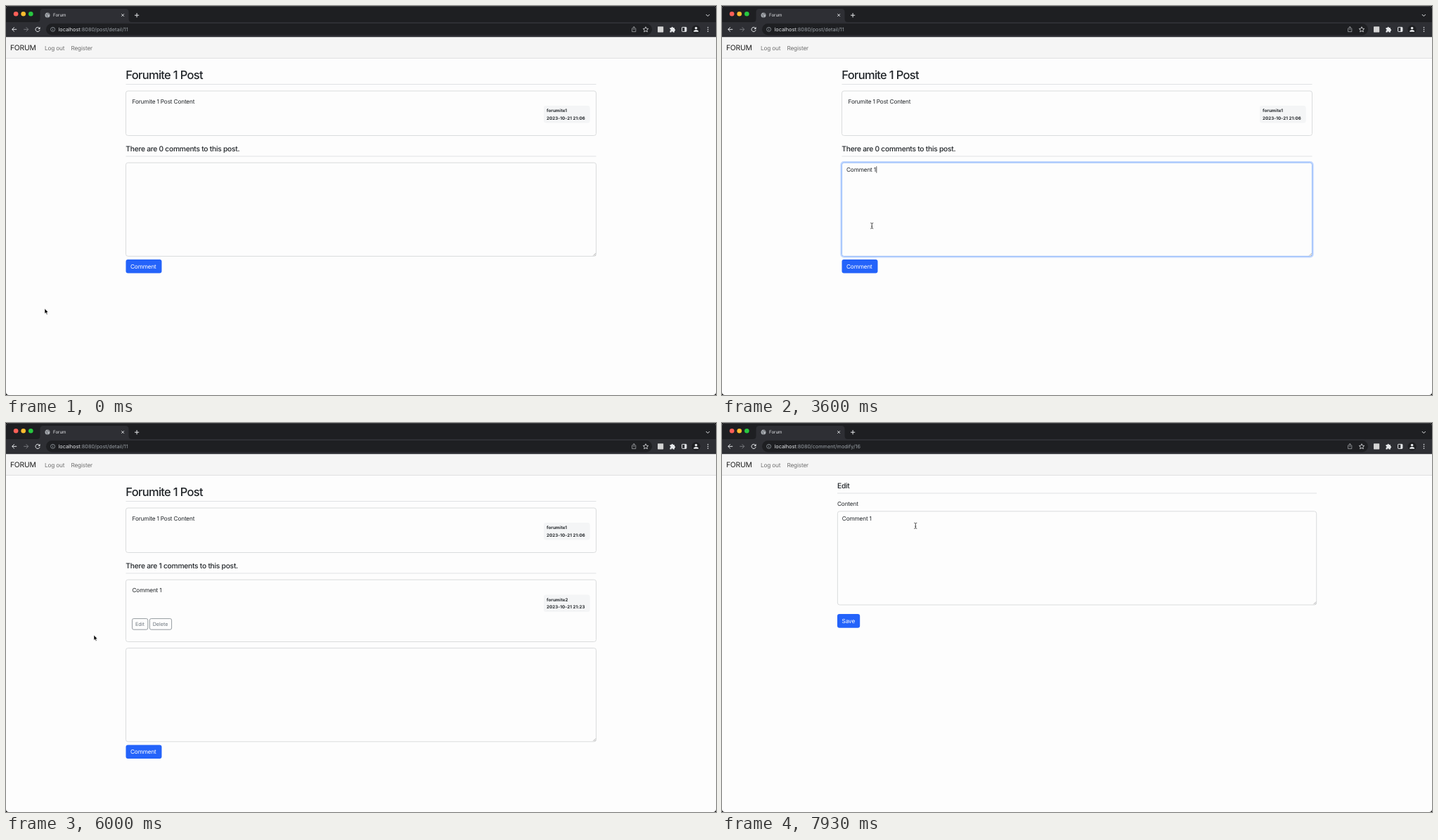
An HTML page for the animation above (8 s loop, 1010 px wide and 554 px high).

```html
<!DOCTYPE html>
<html lang="en">
<head>
<meta charset="utf-8">
<title>Forum</title>
<style>
html, body { margin: 0; width: 100%; height: 100%; overflow: hidden; background: #000; }
svg { display: block; width: 1010px; height: 554px; }
text { font-family: Inter, "Liberation Sans", sans-serif; text-rendering: geometricPrecision; white-space: pre; }
.body { font-size: 8.26px; letter-spacing: -.02em; }
.h2 { font-size: 16.5px; font-weight: 500; letter-spacing: -.042em; }
.h5 { font-size: 10.3px; font-weight: 500; letter-spacing: -.027em; }
.brand { font-size: 10.3px; letter-spacing: -.02em; }
.badge { font-size: 6.2px; font-weight: 700; letter-spacing: .015em; }
.small { font-size: 7.2px; }
.ui { font-size: 6.2px; }
.url { font-size: 7.3px; }
</style>
</head>
<body>
<svg id="stage" viewBox="0 0 1010 554" xmlns="http://www.w3.org/2000/svg"></svg>
<script>
const LOOP = 8000;
const INK = '#212529', GREY = '#727272', LINE = '#d6d8da', BLUE = [36, 99, 250], BLUE_DARK = [31, 80, 208];
const MESSAGE = 'Comment 1';
const KEY_TIMES = [2370, 2430, 2500, 2570, 2630, 2770, 2870, 3000, 3130];
const FOCUS = 1070, PRESS = 4530, POSTED = 4630, OPEN_EDIT = 7265;

const text = (x, y, cls, str, fill = INK, extra = '') =>
  `<text x="${x}" y="${y}" class="${cls}" fill="${fill}" ${extra}>${str}</text>`;
const box = (x, y, w, h, r, fill, extra = '') =>
  `<rect x="${x}" y="${y}" width="${w}" height="${h}" rx="${r}" fill="${fill}" ${extra}/>`;
const path = (d, stroke, w = 1, extra = '') =>
  `<path d="${d}" fill="none" stroke="${stroke}" stroke-width="${w}" ${extra}/>`;
const dot = (x, y, r, fill, extra = '') => `<circle cx="${x}" cy="${y}" r="${r}" fill="${fill}" ${extra}/>`;
const frame = (x, y, w, h, extra = '') => box(x, y, w, h, 3, '#fdfdfd', `stroke="${LINE}" stroke-width=".9" ${extra}`);
const rule = (x, y, w) => path(`M${x} ${y}h${w}`, '#dddfe1', .9);
const badge = (y, name, date) =>
  box(765, y, 65.6, 24.4, 3, '#f4f5f6') +
  text(769, y + 9.1, 'badge', name) + text(769, y + 19.6, 'badge', date);
const grip = (x, y) => path(`M${x - 4.2} ${y - .8}l3.6 -3.6M${x - 2.2} ${y - .8}l1.6 -1.6`, '#8a8a8a', .6);
const outlined = (id, x, w, label, tx) =>
  box(x, 278.6, w, 15.6, 2.2, 'transparent', `id="${id}" stroke="#7b838a" stroke-width=".8"`) +
  text(tx, 289.1, 'small', label, '#6c757d', `id="${id}Label"`);

function browser() {
  const light = '#e6e8eb', dim = '#9aa0a6', bar = '#2e2f34', dark = '#1e1f22';
  return box(0, 0, 1010, 44.5, 0, dark) +
    path('M4 .4H1006', '#55565a', .6) +
    dot(14.1, 11.2, 3.3, '#fe5f57') + dot(24.7, 11.2, 3.3, '#febc2e') + dot(35.3, 11.2, 3.3, '#28c840') +
    `<path d="M44 23q4.5 0 4.5 -4.5V8.5q0 -4.5 4.5 -4.5H170q4.5 0 4.5 4.5V18.500q0 4.500 4.500 4.500z" fill="${bar}"/>` +
    box(0, 23, 1010, 21.500, 0, bar) +
    dot(59, 13.100, 3.500, '#a9adb2') +
    path('M56.600 11.400l2 1.200 -.6 1.600 1.400 2M59.500 9.900l.3 1.400 2 .4', '#55585d', .9) +
    `<g clip-path="url(#tabClip)">${text(67, 15.300, 'ui', 'Forum', light, 'id="tabTitle"')}</g>` +
    box(145, 8, 13, 10, 0, 'url(#tabFade)') +
    path('M164.300 11.200l3.700 3.700m0 -3.700l-3.700 3.700', light, .9) +
    path('M183 13.200h6.200m-3.100 -3.100v6.200', light, 1) +
    path('M995.800 12l2.500 2.500 2.500 -2.500', light, 1) +
    path('M15.200 33.300H8.700m3.100 -3.100l-3.100 3.100 3.100 3.100', light, 1) +
    path('M25.200 33.300h6.500m-3.100 -3.100l3.100 3.100 -3.100 3.100', '#77797e', 1) +
    `<g id="reload">${path('M47.700 31.700A3.100 3.100 0 1 0 48.100 34.100', light, 1)}<path d="M48.500 29.700v3.200h-3.200z" fill="${light}"/></g>` +
    path('M42.500 30.600l5.300 5.300m0 -5.300l-5.300 5.300', light, 1, 'id="stop"') +
    box(57, 25.100, 862, 16.400, 8.200, dark) +
    dot(66.600, 33.300, 3, 'none', `stroke="${dim}" stroke-width=".8"`) +
    path('M66.600 32.900v2M66.600 31.300v.8', dim, .8) +
    text(74.500, 35.900, 'url', `<tspan fill="${light}">localhost</tspan><tspan id="route"></tspan>`, dim) +
    path('M891.900 31.900h-1.300v4.700h5.200v-4.700h-1.300M893.200 34.300v-4.900m-1.600 1.600l1.600 -1.600 1.600 1.600', '#b5b8bc', .7) +
    path('M910 29.700l1.100 2.400 2.600 .3 -1.900 1.800 .5 2.600 -2.300 -1.300 -2.300 1.300 .5 -2.600 -1.900 -1.800 2.600 -.3z', light, .8) +
    box(927, 29.200, 8.200, 8.200, .6, '#d4d4d4') +
    `<path d="M944.500 31h2a1.200 1.200 0 1 1 2.400 0h2v2.100a1.200 1.200 0 1 1 0 2.400v1.900h-2.200a1.100 1.100 0 1 0 -2.200 0h-2v-2.200a1.100 1.100 0 1 0 0 -2.200z" fill="${light}"/>` +
    box(961.600, 30.300, 6.300, 6.100, .6, 'none', `stroke="${light}" stroke-width="1"`) +
    box(965.300, 30.300, 2.600, 6, 0, light) +
    dot(981.600, 33.300, 6, dark) + dot(981.600, 31.500, 1.800, light) +
    `<path d="M978.100 36.700q0 -2.600 3.500 -2.600t3.500 2.600z" fill="${light}"/>` +
    [30.500, 33.300, 36.100].map(y => dot(998.500, y, .8, light)).join('') +
    box(0, 44.300, 1010, 30, 0, '#f5f5f5') + path('M0 74.400h1010', '#d9d9da', .8) +
    text(6, 63.100, 'brand', 'FORUM', '#1a1a1a') +
    text(55, 62.500, 'body', 'Log out', GREY) + text(92.400, 62.500, 'body', 'Register', GREY);
}

function postPage() {
  return `<g id="post">` +
    text(170.300, 103.700, 'h2', 'Forumite 1 Post') + rule(170.500, 111.500, 669) +
    frame(170.500, 121, 669, 63.500) + text(179.500, 138.600, 'body', 'Forumite 1 Post Content') +
    badge(142, 'forumite1', '2023-10-21 21:06') +
    text(170.300, 207.100, 'h5', '', INK, 'id="count"') + rule(170.500, 214, 669) +
    `<g id="reply">` + frame(170.500, 223.200, 669, 88.300) + text(179.500, 241.100, 'body', MESSAGE) +
    badge(244.600, 'forumite2', '2023-10-21 21:23') +
    outlined('edit', 179.500, 22.300, 'Edit', 184) + outlined('del', 204.400, 31.200, 'Delete', 208.700) + `</g>` +
    `<g id="form">` +
    box(169.400, 222.100, 671.200, 135.400, 4, 'none', 'id="ring" stroke="#c3d8fe" stroke-width="2.200"') +
    frame(170.500, 223.200, 669, 133.200, 'id="area"') + grip(839.500, 356.400) +
    text(177, 236, 'body', '', INK, 'id="typed"') + box(0, 228.300, .7, 9.400, 0, '#111', 'id="caret"') +
    box(169.500, 360, 53, 21.500, 4, '#b9cefd', 'id="sendRing"') +
    box(170.500, 361, 51, 19.600, 3, '#2463fa', 'id="send"') + text(177, 373.800, 'body', 'Comment', '#fff') +
    `</g></g>`;
}

function editPage() {
  return `<g id="editor">` +
    text(164, 92.900, 'h5', 'Edit') + rule(164, 100, 682) +
    text(164, 118.300, 'body', 'Content') +
    frame(164.400, 125.800, 681.300, 133.200) + grip(845.700, 259) +
    text(170.800, 138.600, 'body', MESSAGE) +
    box(164, 272, 32.200, 19.700, 3, '#2463fa') + text(170.600, 284.900, 'body', 'Save', '#fff') + `</g>`;
}

const pointers =
  `<g id="arrow"><path d="M0 0V7.400L1.700 5.900L2.900 8.600L4.100 8.100L3 5.500H5.200Z" fill="#000" stroke="#fff" stroke-width=".6"/></g>` +
  `<g id="beam">${path('M-2 -4q1.500 0 2 .8q.5 -.8 2 -.8M0 -3.200V3.200M-2 4q1.500 0 2 -.8q.5 .8 2 .8M-.9 .9h1.800', '#222', .8)}</g>` +
  `<g id="hand"><path d="M-.8 .4q.8 -.9 1.500 0v2.800q.8 -.6 1.400 .1q.8 -.5 1.300 .2q1 -.2 1.100 .7v2q-.1 1 -.7 1.700v1h-4v-.9l-2.400 -3q-.3 -1 .7 -.9l1.100 .9z" fill="#fff" stroke="#111" stroke-width=".75"/></g>`;

const stage = document.getElementById('stage');
stage.innerHTML =
  `<defs><linearGradient id="tabFade"><stop stop-color="#2e2f34" stop-opacity="0"/><stop offset="1" stop-color="#2e2f34"/></linearGradient>` +
  `<clipPath id="tabClip"><rect x="60" y="5" width="97" height="16"/></clipPath>` +
  `<clipPath id="window"><rect width="1010" height="554" rx="4"/></clipPath></defs>` +
  `<rect width="1010" height="554" fill="#000"/><g clip-path="url(#window)">` +
  box(0, 0, 1010, 554, 0, '#fdfdfd') + browser() + postPage() + editPage() +
  `<g id="status">${box(-3, 543.800, 115.400, 13, 2, '#1e1f22')}${text(2.500, 551.200, 'ui', 'localhost:8080/comment/modify/16', '#e6e8eb')}</g>` +
  pointers + `</g>`;

const el = {};
stage.querySelectorAll('[id]').forEach(n => el[n.id] = n);
const show = (id, on) => el[id].setAttribute('visibility', on ? 'inherit' : 'hidden');
const set = (id, name, value) => el[id].setAttribute(name, value);
const write = (id, str) => { if (el[id].textContent !== str) el[id].textContent = str; };
const clamp = v => Math.max(0, Math.min(1, v));
const ramp = (t, from, ms) => clamp((t - from) / ms);
const mix = (a, b, k) => `rgb(${a.map((v, i) => Math.round(v + (b[i] - v) * k))})`;
const between = (t, a, b) => t >= a && t < b;
const inside = (p, x, y, w, h) => p.x >= x && p.x <= x + w && p.y >= y && p.y <= y + h;

// Each leg: start, end, target x, target y
const LEGS = [
  [570, 1030, 214.600, 307.500],
  [3500, 4060, 198.700, 371.300],
  [4680, 5100, 125, 302],
  [6330, 6860, 189.300, 289.300],
  [7390, 7930, 275.300, 146.300]
];

function pointerAt(t) {
  const p = { x: 55, y: 430.800 };
  for (const [from, to, x, y] of LEGS) {
    const k = ramp(t, from, to - from), e = k * k * (3 - 2 * k);
    p.x += (x - p.x) * e;
    p.y += (y - p.y) * e;
  }
  return p;
}

function pointerKind(t, p) {
  if (between(t, KEY_TIMES[0], 3500)) return '';
  if (t >= OPEN_EDIT) {
    if (inside(p, 164, 126, 682, 133)) return 'beam';
    return inside(p, 164, 272, 32, 20) ? 'hand' : 'arrow';
  }
  const dy = t >= POSTED ? 97.400 : 0;
  if (inside(p, 170, 223 + dy, 670, 133)) return 'beam';
  if (inside(p, 170, 361 + dy, 51, 20)) return 'hand';
  if (dy && inside(p, 179.500, 278.600, 22.300, 15.600)) return 'hand';
  // the pointer keeps its shape until it first moves on the new page
  return between(t, POSTED, 4700) ? 'hand' : 'arrow';
}

function draw(t) {
  const posted = t >= POSTED, editing = t >= OPEN_EDIT;
  const p = pointerAt(t), kind = pointerKind(t, p);

  show('post', !editing);
  show('editor', editing);
  show('reply', posted && !editing);
  set('form', 'transform', `translate(0 ${posted ? 97.400 : 0})`);
  write('count', `There are ${posted ? 1 : 0} comments to this post.`);
  write('route', editing ? ':8080/comment/modify/16' : ':8080/post/detail/11');

  const busy = between(t, 4570, 4760) || between(t, 7235, 7370);
  show('stop', busy);
  show('reload', !busy);
  write('tabTitle', between(t, OPEN_EDIT, 7370) ? 'localhost:8080/comment/modify/16' : 'Forum');

  const focus = posted ? 0 : ramp(t, FOCUS, 150) * (1 - ramp(t, PRESS, 100));
  set('ring', 'opacity', focus);
  set('area', 'stroke', mix([214, 216, 218], [134, 177, 250], focus));
  const typed = posted ? '' : MESSAGE.slice(0, KEY_TIMES.filter(k => t >= k).length);
  write('typed', typed);
  set('caret', 'x', 177.500 + (typed ? el.typed.getComputedTextLength() : 0));
  const lastKey = KEY_TIMES.filter(k => t >= k).pop() || FOCUS;
  show('caret', !editing && between(t, FOCUS, PRESS) && Math.floor((t - lastKey) / 500) % 2 === 0);

  const over = kind === 'hand' && between(t, 3500, POSTED);
  set('send', 'fill', mix(BLUE, BLUE_DARK, over ? ramp(t, 3940, 120) : 0));
  show('sendRing', between(t, PRESS + 30, POSTED));

  const hover = kind === 'hand' && between(t, 6330, OPEN_EDIT) ? ramp(t, 6660, 150) : 0;
  set('edit', 'fill', `rgba(108,117,125,${hover})`);
  set('editLabel', 'fill', mix([108, 117, 125], [255, 255, 255], hover));
  set('status', 'opacity', ramp(t, 6720, 120) * (1 - ramp(t, 7480, 150)));

  for (const id of ['arrow', 'beam', 'hand']) {
    show(id, id === kind);
    set(id, 'transform', `translate(${p.x.toFixed(2)} ${p.y.toFixed(2)})`);
  }
}

function tick() {
  draw(performance.now() % LOOP);
  requestAnimationFrame(tick);
}
tick();
</script>
</body>
</html>
```
